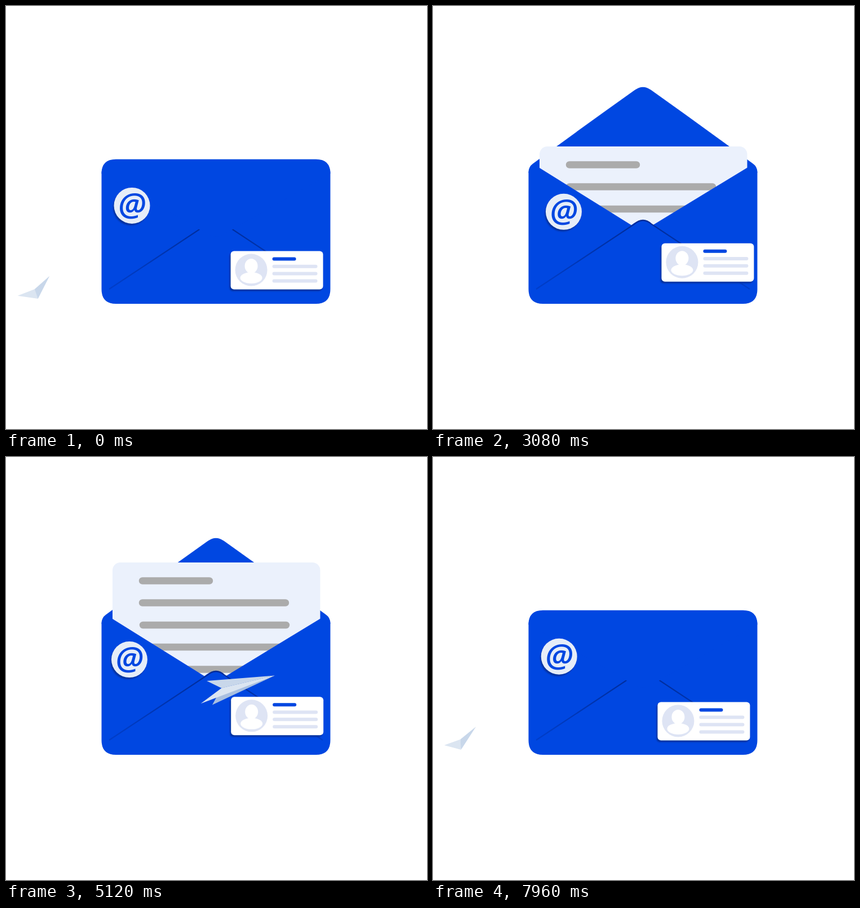
Recreate the animation shown at these times as an HTML page. Size 747 px wide and 750 px high, loop 8000 ms.

```html
<!DOCTYPE html>
<html lang="en">
<head>
<meta charset="utf-8">
<title>Mail</title>
<style>
  html, body { margin: 0; width: 100%; height: 100%; overflow: hidden; background: #fff; }
  svg { display: block; width: 100%; height: 100%; }
  text { font: italic 600 57px "Open Sans", "Noto Sans", sans-serif; text-anchor: middle; }
</style>
</head>
<body>
<svg viewBox="0 0 747 750">
  <defs>
    <clipPath id="above"><path d="M0 0H747V400H0Z"/></clipPath>
    <linearGradient id="crease" gradientUnits="userSpaceOnUse" x1="0" y1="378" x2="0" y2="502">
      <stop offset="0" stop-color="#002a95"/>
      <stop offset="1" stop-color="#002a95" stop-opacity=".3"/>
    </linearGradient>
    <filter id="soft" x="-20%" y="-20%" width="140%" height="140%"><feGaussianBlur stdDeviation="1.2"/></filter>
    <g id="plane">
      <path fill="#c8d7ea"/><path fill="#a8bfe0"/><path fill="#dbe5f1"/>
    </g>
  </defs>

  <use id="planeBack" href="#plane"/>
  <path id="flapBack" fill="#0047e1"/>
  <path fill="#0047e1" d="M170 300Q170 285 180 285H565Q575 285 575 300V400H170Z"/>
  <path fill="#eaf0fa" d="M190 400V291Q190 277 205 277H541Q556 277 556 291V400Z"/>

  <g clip-path="url(#above)">
    <g id="letter">
      <rect x="189" width="368.500" height="230" rx="14" fill="#ebf1fc"/>
      <path stroke="#ababab" stroke-width="12.500" stroke-linecap="round"
        d="M242 32.500H361M242 71.500H496M243 111H497M243 150H497M243 189.500H497"/>
    </g>
  </g>

  <path fill="#0047e1" d="M169.500 297Q169.500 276 189 287L352 388.500Q372 372 390 388.500L557 287Q575.500 276 575.500 297V502Q575.500 528 550 528H195Q169.500 528 169.500 502Z"/>
  <path fill="#0047e1" stroke="url(#crease)" stroke-width="2.200"
    d="M183 502L357 387Q372.500 373 388 387L562 502"/>
  <path id="flapFront" fill="#0047e1"/>

  <g id="card">
    <rect x="-2" y="3" width="164" height="68" rx="6" fill="#00309f" filter="url(#soft)"/>
    <rect width="164" height="68" rx="6" fill="#fff"/>
    <circle cx="36.500" cy="33.500" r="28.500" fill="#dee4f4"/>
    <g fill="#fff">
      <ellipse cx="36.500" cy="26.500" rx="11.500" ry="13"/>
      <path d="M31 34H42V42H31Z"/>
      <ellipse cx="36.500" cy="47.500" rx="19.500" ry="10"/>
    </g>
    <path stroke="#0047e1" stroke-width="6" stroke-linecap="round" d="M77 14H113"/>
    <path stroke="#dee4f4" stroke-width="6" stroke-linecap="round" d="M77 27.200H151M77 40H151M77 53H151"/>
  </g>

  <g id="badge">
    <circle cx="-2" cy="3.500" r="31.500" fill="#00309f" filter="url(#soft)"/>
    <circle r="32" fill="#e6edf8"/>
    <text y="18" fill="#0047e1">@</text>
  </g>
  <use id="planeFront" href="#plane"/>
</svg>

<script>
const LOOP = 8000, HALF = 4000;
const { sin, cos, PI, abs, min, max } = Math;
const $ = id => document.getElementById(id);
const facets = $('plane').children;

function ease(t, start, end) {
  const u = min(1, max(0, (t - start) / (end - start)));
  return u < .5 ? 2 * u * u : 1 - 2 * (1 - u) ** 2;
}

// Floating motion: a sum of the first harmonics of the loop.
const drift = (t, mean, cosines, sines) => {
  const a = 2 * PI * t / LOOP;
  return mean + cosines.reduce((sum, c, i) => sum + c * cos((i + 1) * a), 0)
    + sines.reduce((sum, c, i) => sum + c * sin((i + 1) * a), 0);
};

// openness: 1 points up, 0 is edge-on, below 0 folds over the front.
function flapPath(openness) {
  const base = 285, rise = 146.5 * openness, flat = 1 - abs(openness);
  const cut = .07 + .04 * flat, half = 202.5 * cut, mid = 372.5;
  const shoulder = base - rise * (1 - cut), tip = base - rise;
  if (openness >= 0) {
    const y = base - rise * .035, bulge = (y + shoulder) / 2 - 10 * flat * min(1, 4 * openness);
    return `M169.5 296Q169.5 ${base} 177 ${y}Q266 ${bulge} ${mid - half} ${shoulder}` +
      `Q${mid} ${tip} ${mid + half} ${shoulder}Q479 ${bulge} 568 ${y}Q575.5 ${base} 575.5 296Z`;
  }
  const top = base - 13.3 * min(1, -4 * openness);
  return `M169.5 297Q169.5 ${top} 195 ${top}H550Q575.5 ${top} 575.5 297` +
    `L${mid + half} ${shoulder}Q${mid} ${tip} ${mid - half} ${shoulder}Z`;
}

// The plane circles the envelope on a tilted orbit, turning with its heading.
function drawPlane(t) {
  const turn = 2 * PI * (t + 50) / HALF;
  const a = turn - .3 * sin(turn) ** 2, s = sin(a), c = cos(a);
  const tail = [354 - 306 * c, 382 + 112 * c + 34 * s];
  const ahead = [(98 + 28 * s) * s, 25 * c - 30 * s];
  const wing = [(7 * c - 35) * c - 5 * s, 16 * c + 20 * s];
  const point = (forward, side, drop = 0) =>
    tail.map((v, i) => v + forward * ahead[i] + side * wing[i] + i * drop);
  const nose = point(1, 0), fold = point(.25, 0), keel = point(.12, 0, 12 + 14 * s);
  const lit = wing[0] < 0 ? 1 : -1;
  [point(0, -lit), keel, point(0, lit)].forEach((tip, i) =>
    facets[i].setAttribute('d', `M${nose}L${tip}L${fold}Z`));
  const front = t < HALF / 2;
  $('planeFront').style.display = front ? '' : 'none';
  $('planeBack').style.display = front ? 'none' : '';
}

const place = (id, x, y) => $(id).setAttribute('transform', `translate(${x} ${y})`);

function draw(time) {
  const t = time % LOOP, h = t % HALF;
  const openness = -.88 + 1.88 * (ease(h, 98, 748) - ease(h, 3293, 3943));
  $('flapBack').setAttribute('d', openness >= 0 ? flapPath(openness) : '');
  $('flapFront').setAttribute('d', openness < 0 ? flapPath(openness) : '');
  place('letter', 0, 387 - 200 * (ease(h, 740, 1080) - ease(h, 2955, 3275)));
  place('badge', drift(t, 227.5, [3, -7], [4, -5]), drift(t, 354.4, [-4, -3.5, 7], [6]));
  place('card', drift(t, 402, [0, -3.4], [1.8, -1.2, 1.8]), drift(t, 426, [3.5, 5], [1.5, 3, -1.5]));
  drawPlane(h);
}

const start = performance.now();
function tick() {
  draw(performance.now() - start);
  requestAnimationFrame(tick);
}
tick();
</script>
</body>
</html>
```
